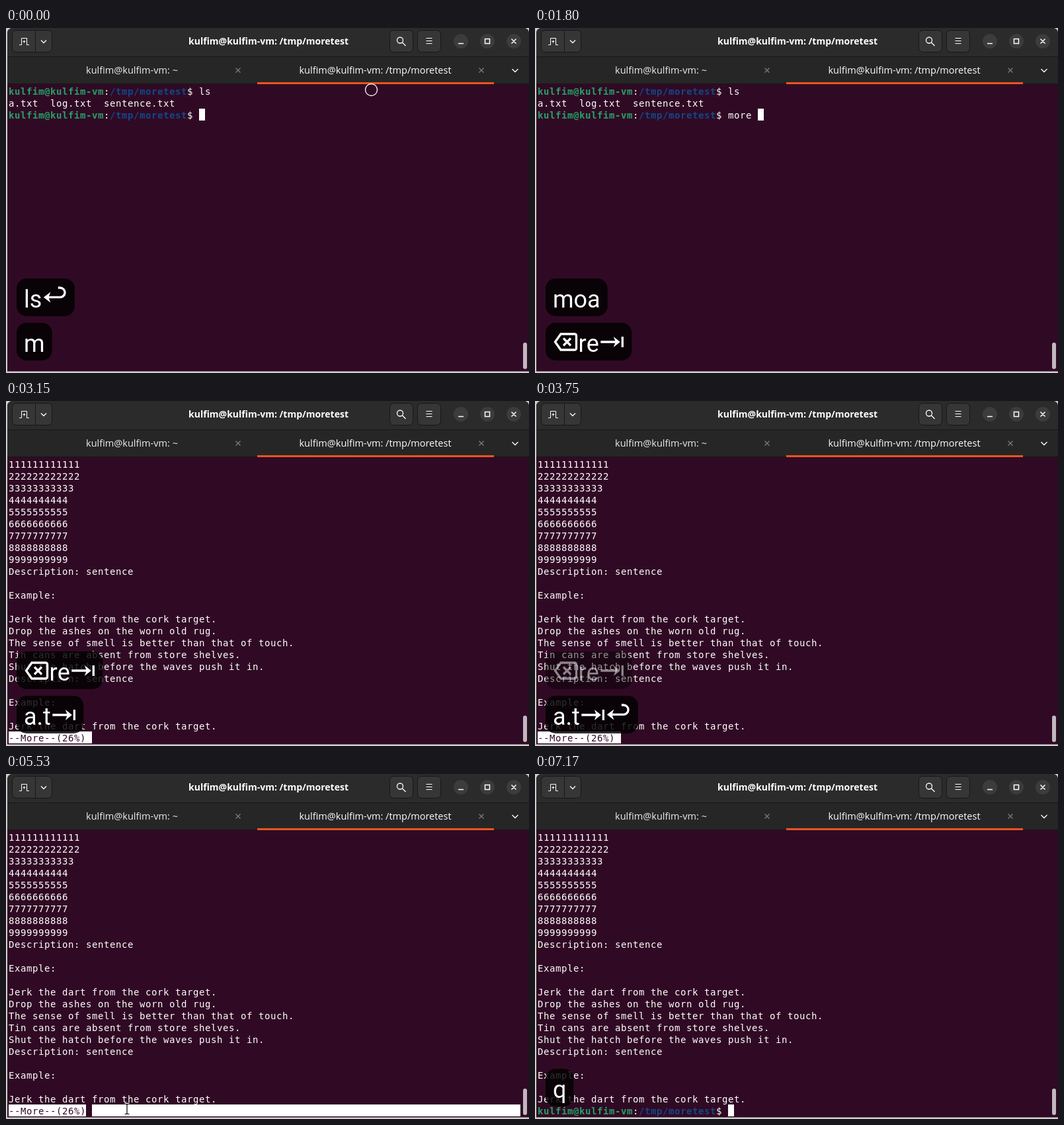
Animation of 791x522 px, one loop 8 s. Source, as an HTML page with a canvas:

```html
<!DOCTYPE html>
<html lang="en">
<head>
<meta charset="utf-8">
<title>Terminal</title>
<style>
html, body { margin: 0; width: 100%; height: 100%; overflow: hidden; background: #300a24; }
canvas { display: block; }
</style>
</head>
<body>
<canvas id="stage" width="791" height="522"></canvas>
<script>
const ctx = document.getElementById('stage').getContext('2d');
const LOOP = 8000, TICK = 149.3;
const MONO = '14px "DejaVu Sans Mono", monospace';
const UI = '"Open Sans", sans-serif';
const USER = 'kulfim@kulfim-vm', DIR = '/tmp/moretest';
const CELL = 9, ROW = 18, LEFT = 4, TOP = 86;

ctx.font = MONO;
const SPACING = CELL - ctx.measureText('0').width + 'px';

const passage = ['Description: sentence', '', 'Example:', '', 'Jerk the dart from the cork target.'];
const page = [
  ...[12, 12, 11, 10, 10, 10, 10, 10, 10].map((n, i) => String(i + 1).repeat(n)),
  ...passage,
  'Drop the ashes on the worn old rug.',
  'The sense of smell is better than that of touch.',
  'Tin cans are absent from store shelves.',
  'Shut the hatch before the waves push it in.',
  ...passage
];

// All times below are in ticks.
const typed = [[0, ''], [1, 'mo'], [3, 'moa'], [9, 'mo'], [10, 'more'], [12, 'more '],
  [16, 'more a'], [17, 'more a.'], [18, 'more a.t'], [19, 'more a.txt ']];
const PAGE_AT = 21, QUIT_AT = 48;
const SELECT = [36, 41];

// Key bubbles: B = backspace, T = tab, R = return.
const bubbles = [
  [[-5, 'lsR']],
  [[0, 'm'], [1, 'mo'], [3, 'moa']],
  [[9, 'B'], [10, 'Bre'], [12, 'BreT']],
  [[16, 'a'], [17, 'a.'], [18, 'a.t'], [19, 'a.tT'], [22, 'a.tTR']],
  [[48, 'q']]
];
const FADE = 13, GONE = 14, KEY_W = 38.5;
const icons = {
  B: { line: 'M12 17H33a2.5 2.5 0 0 1 2.5 2.5V38.5a2.5 2.5 0 0 1-2.5 2.5H12L3.5 29z M16 23.5l11 11m0-11l-11 11' },
  T: { line: 'M2.5 29H27M35.5 21v16', fill: 'M32 29l-10-8 3 8-3 8z' },
  R: { line: 'M24.5 14h3a7.2 7.2 0 0 1 0 14.4H8', fill: 'M2.5 28.400l10.500-8-3 8 3 8z' }
};
for (const i of Object.values(icons)) {
  i.line = new Path2D(i.line);
  i.fill = i.fill && new Path2D(i.fill);
}

const at = (steps, k) => steps.reduce((v, s) => s[0] <= k ? s[1] : v, undefined);

function rect(x, y, w, h, fill) {
  ctx.fillStyle = fill;
  ctx.fillRect(x, y, w, h);
}
function round(x, y, w, h, r, fill, stroke) {
  ctx.beginPath();
  ctx.roundRect(x, y, w, h, r);
  ctx.fillStyle = fill;
  ctx.fill();
  if (stroke) { ctx.strokeStyle = stroke; ctx.lineWidth = 1; ctx.stroke(); }
}
function disc(x, y, r, fill) {
  ctx.beginPath();
  ctx.arc(x, y, r, 0, 7);
  ctx.fillStyle = fill;
  ctx.fill();
}
function line(path, color = '#fff', width = 1.5) {
  ctx.strokeStyle = color;
  ctx.lineWidth = width;
  ctx.stroke(new Path2D(path));
}
function label(s, x, y, font, color) {
  ctx.font = font;
  ctx.textAlign = 'center';
  ctx.fillStyle = color;
  ctx.fillText(s, x, y);
  ctx.textAlign = 'left';
}

function chrome() {
  rect(0, 0, 791, 522, '#d0cdcf');
  round(2, 0, 789, 519.5, [8, 8, 0, 0], '#300a24');
  round(2, 0, 789, 43, [8, 8, 0, 0], '#2b2b2b');
  rect(2, 43, 789, 1, '#191919');
  rect(2, 44, 789, 40, '#262626');
  rect(2, 84, 789, 1, '#161616');
  rect(380, 82, 358, 3, '#e95420');

  for (const [x, w] of [[9.5, 60], [580.5, 35], [622.5, 35]]) round(x, 3.5, w, 33, 6, '#363636', '#171717');
  rect(44, 4, 1, 33, '#171717');
  line('M20 25.5h3.5v-10h8v10H35M27.5 18.500v4M25.500 20.500h4', '#fff', 1);
  line('M53 18.500l4 4 4-4', '#fff', 1.3);
  line('M600.500 18.500a4.500 4.500 0 1 1-9 0a4.500 4.500 0 1 1 9 0M599.500 22l5 5', '#fff', 1.3);
  line('M635.500 15.500h9M635.500 19.500h9M635.500 23.500h9', '#fff', 1.2);
  for (const x of [688, 728, 768]) disc(x, 20, 11, '#3c3c3c');
  line('M684 23.500h8M724.500 16.500h7v7h-7zM764.500 16.500l7 7m0-7l-7 7');
  line('M765.500 62l4.500 4.500 4.500-4.500', '#fff', 1.3);
  for (const x of [347.5, 715.5]) line(`M${x} 60.500l7 7m0-7l-7 7`, '#7c7c7c', 1.3);

  label(`${USER}: ${DIR}`, 397, 25, `bold 14px ${UI}`, '#fff');
  label(`${USER}: ~`, 190.5, 69, `14.5px ${UI}`, '#ededed');
  label(`${USER}: ${DIR}`, 558.5, 69, `14.5px ${UI}`, '#fff');
  round(782, 476, 6, 40, 3, '#c0b8be');
}

function print(s, row, col = 0, color = '#fff', bold = false) {
  ctx.font = (bold ? 'bold ' : '') + MONO;
  ctx.letterSpacing = SPACING;
  ctx.fillStyle = color;
  ctx.fillText(s, LEFT + col * CELL, TOP + row * ROW + 15);
  ctx.letterSpacing = '0px';
}
function block(row, col, n = 1, color = '#fff') {
  rect(LEFT + col * CELL, TOP + row * ROW, n * CELL, ROW, color);
}
function prompt(row, text, caret) {
  const colon = USER.length, end = colon + 1 + DIR.length;
  print(USER, row, 0, '#26a269', true);
  print(':', row, colon);
  print(DIR, row, colon + 1, '#12488b', true);
  print('$ ' + text, row, end);
  if (caret) block(row, end + 2 + text.length);
}

function shell(k) {
  if (k < PAGE_AT) {
    prompt(0, 'ls');
    print('a.txt  log.txt  sentence.txt', 1);
    prompt(2, at(typed, k), true);
    return;
  }
  page.forEach((s, i) => print(s, i));
  if (k >= QUIT_AT) return prompt(23, '', true);
  const status = '--More--(26%)', n = status.length;
  block(23, 0, n);
  print(status, 23, 0, '#300a24');
  if (k >= SELECT[0] && k < SELECT[1]) block(23, n + 1, 72);
  else block(23, n);
}

function bubble(keys, y, alpha) {
  ctx.save();
  ctx.globalAlpha = alpha;
  ctx.font = '36px Roboto, sans-serif';
  const width = c => icons[c] ? KEY_W : ctx.measureText(c).width;
  const total = [...keys].reduce((w, c) => w + width(c), 22);
  round(16, y, total, 57, 15, 'rgba(0,0,0,.82)');
  ctx.fillStyle = ctx.strokeStyle = '#fff';
  ctx.lineWidth = 3.3;
  let x = 27;
  for (const c of keys) {
    const icon = icons[c];
    if (icon) {
      ctx.save();
      ctx.translate(x, y);
      ctx.stroke(icon.line);
      if (icon.fill) ctx.fill(icon.fill);
      ctx.restore();
    } else ctx.fillText(c, x, y + 44);
    x += width(c);
  }
  ctx.restore();
}
function overlay(k) {
  const born = bubbles.filter(b => b[0][0] <= k);
  born.forEach((b, i) => {
    const age = k - b[b.length - 1][0];
    if (age < GONE) bubble(at(b, k), 446 - 67 * (born.length - 1 - i), age < FADE ? 1 : 0.5);
  });
}

function ring(x, y) {
  ctx.beginPath();
  ctx.arc(x, y, 9, 0, 7);
  ctx.strokeStyle = '#fff';
  ctx.lineWidth = 1.3;
  ctx.stroke();
}
function beam(x, y) {
  const d = `M${x - 3.5} ${y - 7.5}h2.5l1 1 1-1h2.5M${x} ${y - 6.5}v13M${x - 3.5} ${y + 7.5}h2.5l1-1 1 1h2.5`;
  line(d, '#fff', 3.4);
  line(d, '#000', 1.2);
}
const path = [[26, 534, 119], [32, 163, 504], [34, 160, 505], [37, 183, 507], [41, 183, 507], [43, 200, 467]];
function pointer(k) {
  if (k < 1) ring(552.5, 93.5);
  if (k < path[0][0] || k >= QUIT_AT) return;
  const i = path.findIndex(p => p[0] > k);
  let [, x, y] = path[path.length - 1];
  if (i > 0) {
    const [t0, x0, y0] = path[i - 1], [t1, x1, y1] = path[i];
    const u = (k - t0) / (t1 - t0), e = u * u * (3 - 2 * u);
    x = x0 + (x1 - x0) * e;
    y = y0 + (y1 - y0) * e;
  }
  beam(x, y);
  if (k === 34 || k === 41) ring(x, y);
}

const start = performance.now();
function draw() {
  const k = Math.floor((performance.now() - start) % LOOP / TICK);
  chrome();
  shell(k);
  overlay(k);
  pointer(k);
  requestAnimationFrame(draw);
}
draw();
</script>
</body>
</html>
```
